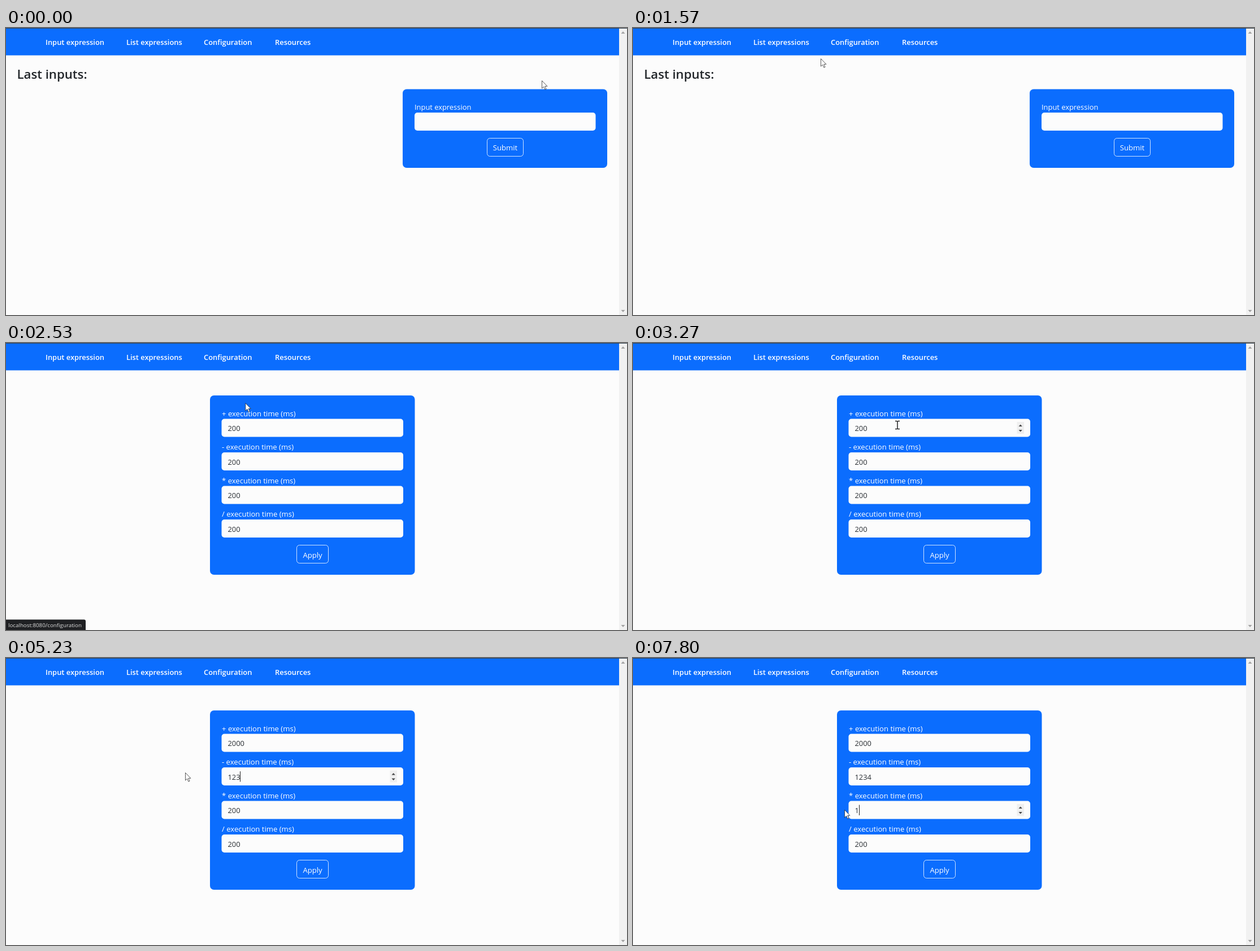
These frames come from a looping animation (1099 px wide and 509 px high, 8 s). An HTML page:

```html
<!DOCTYPE html>
<html lang="en">
<head>
<meta charset="utf-8">
<title>Configuration form</title>
<style>
  html, body { margin: 0; width: 100%; height: 100%; overflow: hidden; background: #fcfcfc; }
  svg { display: block; width: 1099px; height: 509px; }
  text { font-family: "Open Sans", "Noto Sans", sans-serif; font-size: 12.9px; fill: #fff; white-space: pre; }
  .nav { font-weight: 600; font-size: 12.9px; }
  .title { font-weight: 600; font-size: 22.2px; fill: #212529; }
  .label { font-size: 13.1px; }
  .value { fill: #2b3035; }
  .selected { fill: #fff; }
  .button { font-size: 13.1px; text-anchor: middle; }
  .status { font-size: 9.75px; fill: #dedede; }
  .blue { fill: #0b6dfe; }
  .field { fill: #fcfcfc; }
  .outline { fill: none; stroke: #fff; stroke-opacity: .8; }
</style>
</head>
<body>
<svg viewBox="0 0 1099 509">
  <rect width="1099" height="509" fill="#fcfcfc"/>
  <rect class="blue" width="1085" height="48.5"/>
  <rect x="1085" width="14" height="509" fill="#f1f1f1"/>
  <path d="M1088.5 10l3.5-4 3.5 4zM1088.5 500l3.5 4 3.5-4z" fill="#a3a3a3"/>
  <rect width="1099" height="1" fill="#33424f"/>
  <text class="nav" x="70" y="30.3">Input expression</text>
  <text class="nav" x="213" y="30.3">List expressions</text>
  <text class="nav" x="350" y="30.3">Configuration</text>
  <text class="nav" x="476" y="30.3">Resources</text>

  <g id="inputs">
    <text class="title" x="19.5" y="90">Last inputs:</text>
    <rect class="blue" x="702" y="108.5" width="362" height="139.5" rx="7"/>
    <text x="723" y="145">Input expression</text>
    <rect class="field" x="723" y="150" width="320.5" height="32" rx="5"/>
    <rect class="outline" x="851.5" y="195.5" width="64" height="32" rx="5"/>
    <text class="button" x="883.5" y="217.3">Submit</text>
  </g>

  <g id="config">
    <rect class="blue" x="361" y="93" width="362.5" height="318" rx="7"/>
    <rect class="outline" x="514.5" y="358.5" width="56" height="32" rx="5"/>
    <text class="button" x="542.5" y="380.5">Apply</text>
  </g>

  <g id="status">
    <path d="M0 490.5H138q3 0 3 3V509H0z" fill="#1f2023"/>
    <text class="status" x="4" y="503.8">localhost:8080/configuration</text>
  </g>

  <g id="cursor" stroke="#222" fill="#fff" stroke-linejoin="round">
    <path id="arrow" stroke-width=".75"
      d="M.5.5V14L3.6 11.1 5.9 16.2 8 15.2 5.8 10.3H9.9z"/>
    <path id="hand"
      d="M-1.3.8Q0-1 1.3.8V6Q3.5 5 4.3 6.6 6 6 6.6 7.4 8.4 7 8.4 9V12Q8.2 14.5 6.6 17H-.6Q-2.5 13.5-4.6 11 -5.2 8.6-3.2 9L-1.3 10.6z"/>
    <path id="beam" fill="none" stroke-width="1.5"
      d="M-4-7H-1.2L0-6.2 1.2-7H4M0-6.2V6.2M-4 7H-1.2L0 6.2 1.2 7H4"/>
  </g>
</svg>

<script>
  const LOOP = 8000, PAGE_SWITCH = 1930;
  const ROW = 59.5, DIGIT = 7.37, BLINK = 530, KEY_DELAY = 235;
  const byId = id => document.getElementById(id);
  const show = (el, on) => { el.style.display = on ? '' : 'none'; };

  function add(parent, tag, attrs, content = '') {
    const el = document.createElementNS('http://www.w3.org/2000/svg', tag);
    for (const key in attrs) el.setAttribute(key, attrs[key]);
    el.textContent = content;
    parent.append(el);
    return el;
  }

  // Each edited field gets focus, loses its selection (or not), then is typed into.
  const fields = [
    { sign: '+', focus: 2800, clear: 3350, type: 3350, kept: '200', typed: '0' },
    { sign: '-', focus: 3760, select: 3880, clear: 4530, type: 4730, kept: '', typed: '1234' },
    { sign: '*', focus: 6150, select: 6170, clear: 6730, type: 7800, kept: '', typed: '1' },
    { sign: '/' }
  ];

  fields.forEach((field, row) => {
    const g = add(byId('config'), 'g', { transform: `translate(0 ${row * ROW})` });
    add(g, 'text', { class: 'label', x: 382, y: 129.8 }, field.sign + ' execution time (ms)');
    add(g, 'rect', { class: 'field', x: 381.5, y: 134.5, width: 321.5, height: 32, rx: 5 });
    field.stepper = add(g, 'g', {});
    add(field.stepper, 'rect', { x: 679.5, y: 140, width: 12.5, height: 21, fill: '#efefef' });
    add(field.stepper, 'path', { d: 'M682.5 148l3.2-3.5 3.2 3.5zM682.5 154l3.2 3.5 3.2-3.5z', fill: '#454545' });
    field.highlight = add(g, 'rect', { x: 392.5, y: 141, width: 22.5, height: 20, fill: '#3166cc' });
    field.value = add(g, 'text', { x: 392.5, y: 156.2 });
    field.caret = add(g, 'rect', { y: 141.5, width: 1, height: 18.5, fill: '#222' });
  });

  function drawField(field, t, focused, hovered) {
    const edited = t >= field.clear;
    const selected = t >= field.select && !edited;
    const keys = t < field.type ? 0
      : Math.min(field.typed?.length, Math.floor((t - field.type) / KEY_DELAY) + 1);
    const text = edited ? field.kept + field.typed.slice(0, keys) : '200';
    const lastEdit = keys ? field.type + (keys - 1) * KEY_DELAY : field.clear;

    field.value.textContent = text;
    field.value.setAttribute('class', selected ? 'selected' : 'value');
    field.caret.setAttribute('x', Math.round(392.2 + DIGIT * text.length));
    show(field.highlight, selected);
    show(field.stepper, focused || hovered);
    show(field.caret, focused && edited && (t - lastEdit) % (2 * BLINK) < BLINK);
  }

  // Pointer moves: start, end, destination and how far the path sags.
  const moves = [
    { start: 800, end: 1420, x: 279, y: 78, sag: 32 },
    { start: 1420, end: 1570, x: 332, y: 54, sag: 0 },
    { start: 1570, end: 1740, x: 358, y: 37, sag: -8 },
    { start: 2120, end: 2850, x: 468, y: 145.5, sag: 5 },
    { start: 3270, end: 3700, x: 432, y: 210, sag: 0 },
    { start: 3700, end: 4030, x: 317, y: 203, sag: 5 },
    { start: 5430, end: 5970, x: 441, y: 272.5, sag: 50 },
    { start: 6050, end: 6230, x: 374, y: 269, sag: 0 }
  ];

  function pointerAt(t) {
    let x = 948, y = 93;
    for (const move of moves) {
      const k = Math.min(1, Math.max(0, (t - move.start) / (move.end - move.start)));
      const eased = k * k * (3 - 2 * k);
      x += (move.x - x) * eased;
      y += (move.y - y) * eased + move.sag * Math.sin(Math.PI * eased);
    }
    return [x, y];
  }

  function hoveredRow(x, y) {
    const row = Math.floor((y - 134.5) / ROW);
    const inside = x > 381.5 && x < 703 && y - 134.5 - row * ROW < 32;
    return inside && row >= 0 && row < fields.length ? row : -1;
  }

  const start = performance.now();
  function draw() {
    const t = (performance.now() - start) % LOOP;
    const onConfig = t >= PAGE_SWITCH;
    const [x, y] = pointerAt(t);
    const hovered = onConfig ? hoveredRow(x, y) : -1;
    const focused = fields.filter(field => t >= field.focus).length - 1;
    const onLink = y < 48 && x > 330 && x < 456;

    show(byId('inputs'), !onConfig);
    show(byId('config'), onConfig);
    show(byId('status'), t >= 1800 && t < 2600);
    fields.forEach((field, row) => drawField(field, t, row === focused, row === hovered));

    byId('cursor').setAttribute('transform', `translate(${x} ${y})`);
    show(byId('hand'), onLink);
    show(byId('beam'), hovered >= 0);
    show(byId('arrow'), !onLink && hovered < 0);
    requestAnimationFrame(draw);
  }
  draw();
</script>
</body>
</html>
```
